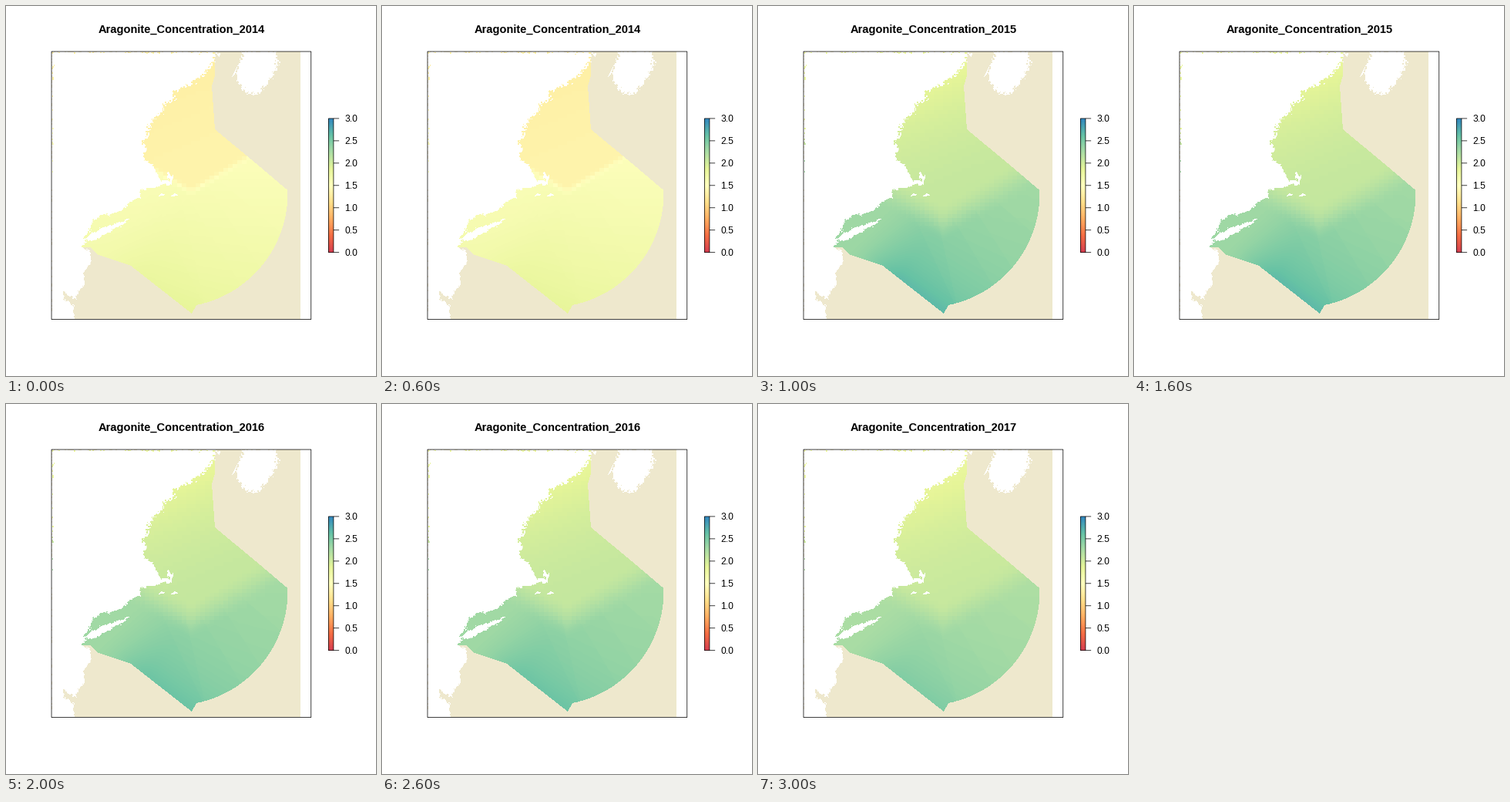
Recreate the animation shown at these times as a matplotlib script. Size 480x480 px, loop 4000 ms.

```python
import numpy as np
import matplotlib.pyplot as plt
from matplotlib.animation import FuncAnimation
from matplotlib.colors import LinearSegmentedColormap
from matplotlib.patches import Rectangle
from matplotlib.path import Path

SIZE = 480
DPI = 100
PX = 72 / DPI
LINE = 0.75 * PX
LEFT, TOP, RIGHT, BOTTOM = 59.04, 59.04, 395.76, 406.56
BAR_LEFT, BAR_TOP, BAR_RIGHT, BAR_BOTTOM = 418.44, 145.92, 424.92, 319.68
SEABED = np.array([238, 232, 205]) / 255
SPECTRAL = LinearSegmentedColormap.from_list("spectral9", [
    "#D53E4F", "#F46D43", "#FDAE61", "#FEE08B", "#FFFFBF",
    "#E6F598", "#ABDDA4", "#66C2A5", "#3288BD"], N=255)

# low: level at the northern coast, gain: rise across the gulf,
# front/spread: place and width of the shelf front, slope: rise southward,
# deep: extra level at the south-west edge, ray: drop across each ray
YEARS = {
    2014: dict(low=1.31, gain=0.06, front=238, spread=14, shelf=1.59,
               slope=0.001, deep=0.06, ray=0.008),
    2015: dict(low=1.82, gain=0.29, front=272, spread=50, shelf=2.30,
               slope=0.0003, deep=0.22, ray=0.020),
    2016: dict(low=1.81, gain=0.30, front=272, spread=50, shelf=2.29,
               slope=0.0003, deep=0.17, ray=0.016),
    2017: dict(low=1.78, gain=0.31, front=272, spread=50, shelf=2.23,
               slope=0.0003, deep=0.13, ray=0.014)}

rng = np.random.default_rng(11)
X, Y = np.meshgrid(np.arange(SIZE) + 0.5, np.arange(SIZE) + 0.5)

# Key points of the shores, in pixels from the top left corner
MAINLAND = [(272, 59), (270, 70), (258, 87), (244, 98), (231, 104),
            (218, 112), (219, 120), (204, 127), (202, 138), (190, 148),
            (187, 160), (177, 176), (183, 184), (180, 200), (194, 213),
            (201, 227), (213, 227), (209, 214), (217, 221), (215, 231),
            (197, 234), (176, 237), (174, 249), (157, 259), (124, 271),
            (110, 284), (101, 301), (105, 306), (98, 314), (107, 316),
            (108, 335), (102, 362), (92, 381), (74, 370), (74, 380),
            (87, 388), (90, 407)]
LONG_ISLAND = [(103, 304), (110, 296), (135, 284), (161, 275), (154, 283),
               (135, 294), (112, 305)]
NOVA_SCOTIA = [(309, 59), (301, 76), (300, 97), (312, 113), (328, 114),
               (346, 92), (353, 78), (352, 59)]
ISLETS = [[(293, 92), (301, 76), (297, 88)],
          [(274, 62), (278, 61), (277, 67)],
          [(197, 247), (202, 243), (207, 245)],
          [(213, 247), (219, 243), (224, 246)]]
DOMAIN_NORTH = [(60, 60), (271, 60), (271, 90), (267, 104), (271, 160),
                (330, 209)]
DOMAIN_SOUTH = [(241, 399), (162, 337), (118, 322), (110, 313), (60, 313)]
ARC_CENTER, ARC_RADIUS = (217.5, 243), 148

# Ray ends: head at the shelf front, foot at the outer rim
RAYS = [((214, 297), (256, 388)), ((236, 290), (258, 388)),
        ((258, 284), (305, 363)), ((284, 268), (330, 340)),
        ((305, 250), (354, 292))]


def smoothstep(t):
    t = np.clip(t, 0, 1)
    return t * t * (3 - 2 * t)


def roughen(points, amount=0.18, depth=3):
    """Break a line into ragged steps by moving midpoints sideways."""
    line = np.array(points, float)
    for _ in range(depth):
        step = np.diff(line, axis=0)
        normal = np.column_stack([-step[:, 1], step[:, 0]])
        shift = rng.uniform(-amount, amount, (len(step), 1))
        mid = line[:-1] + step / 2 + normal * shift
        merged = np.empty((len(line) + len(mid), 2))
        merged[::2], merged[1::2] = line, mid
        line = merged
    return line


def inside(points, x=X, y=Y):
    pixels = np.column_stack([x.ravel(), y.ravel()])
    return Path(points).contains_points(pixels).reshape(SIZE, SIZE)


def jitter(amount):
    """Random shifts shared by blocks of two by two pixels."""
    shifts = rng.normal(0, amount, (SIZE // 2, SIZE // 2))
    return shifts.repeat(2, axis=0).repeat(2, axis=1)


def land_mask():
    ragged = np.where(Y < 180, 1.7, 0.7)
    x, y = X + ragged * jitter(1), Y + ragged * jitter(1)
    mask = inside(np.vstack([(59, 59), roughen(MAINLAND), (59, 407)]), x, y)
    for shore in (LONG_ISLAND, NOVA_SCOTIA):
        mask |= inside(roughen(shore, 0.12), x, y)
    for islet in ISLETS:
        mask |= inside(islet)
    return mask


def survey_mask():
    angles = np.radians(np.linspace(-1.5, 78.5, 60))
    arc = np.column_stack([np.cos(angles), np.sin(angles)])
    return inside(np.vstack([DOMAIN_NORTH, ARC_CENTER + ARC_RADIUS * arc,
                             DOMAIN_SOUTH]))


def rays_to_the_east():
    count = np.zeros_like(X)
    for (hx, hy), (fx, fy) in RAYS:
        count += (fx - hx) * (Y - hy) > (fy - hy) * (X - hx)
    return count


def concentration(low, gain, front, spread, shelf, slope, deep, ray):
    # The gulf and the front are sampled on a coarse grid of cells
    coarse = Y < 285
    x = np.where(coarse, X // 6 * 6 + 3, X)
    y = np.where(coarse, Y // 5 * 5 + 2.5, Y)

    gulf = low + gain * np.tanh(
        np.maximum(0.4 * (x - 200) + y - 95, 0) / 110)
    past_front = y - front + 0.6 * np.abs(x - 240)
    offshore = smoothstep(past_front / spread + 0.3)

    along = (76 * (X - 165) + 60 * (Y - 335)) / 97
    from_edge = np.maximum(60 * (X - 165) - 76 * (Y - 335), 0) / 97
    fan = smoothstep((along + 50) / 80)
    south = shelf + slope * (y - 240) + fan * (
        deep * np.exp(-from_edge / 45) + ray * rays_to_the_east())
    return gulf + offshore * (south - gulf)


def build_maps():
    land = land_mask()
    water = survey_mask() & ~land
    base = np.ones((SIZE, SIZE, 3))
    base[59:406, 59:382] = SEABED
    base[land] = 1
    maps = []
    for settings in YEARS.values():
        picture = base.copy()
        picture[water] = SPECTRAL(concentration(**settings)[water] / 3)[:, :3]
        maps.append(picture)
    return maps


def outline(left, top, right, bottom):
    ax.add_patch(Rectangle((left, top), right - left, bottom - top,
                           fill=False, edgecolor="black", linewidth=LINE,
                           snap=False))


maps = build_maps()
fig = plt.figure(figsize=(SIZE / DPI, SIZE / DPI), dpi=DPI, facecolor="white")
ax = fig.add_axes([0, 0, 1, 1])
ax.axis("off")
image = ax.imshow(maps[0], extent=(0, SIZE, SIZE, 0), interpolation="nearest")
ax.imshow(np.linspace(1, 0, 174)[:, None], cmap=SPECTRAL, aspect="auto",
          extent=(BAR_LEFT, BAR_RIGHT, BAR_BOTTOM, BAR_TOP))
ax.set(xlim=(0, SIZE), ylim=(SIZE, 0))

outline(LEFT, TOP, RIGHT, BOTTOM)
outline(BAR_LEFT, BAR_TOP, BAR_RIGHT, BAR_BOTTOM)
for level in np.arange(0, 3.5, 0.5):
    y = BAR_BOTTOM - (BAR_BOTTOM - BAR_TOP) * level / 3
    ax.plot([BAR_RIGHT, BAR_RIGHT + 7.2], [y, y], color="black",
            linewidth=LINE, solid_capstyle="butt", snap=False)
    ax.text(BAR_RIGHT + 14.4, y + 4.3, f"{level:.1f}",
            family="Liberation Sans", size=12 * PX, va="baseline")
title = ax.text((LEFT + RIGHT) / 2, 35, "", family="Liberation Sans",
                weight="bold", size=14.65 * PX, ha="center", va="baseline")


def update(index):
    image.set_data(maps[index])
    title.set_text(f"Aragonite_Concentration_{list(YEARS)[index]}")
    return image, title


animation = FuncAnimation(fig, update, frames=len(YEARS), interval=1000,
                          repeat=True, repeat_delay=0)
plt.show()
```
